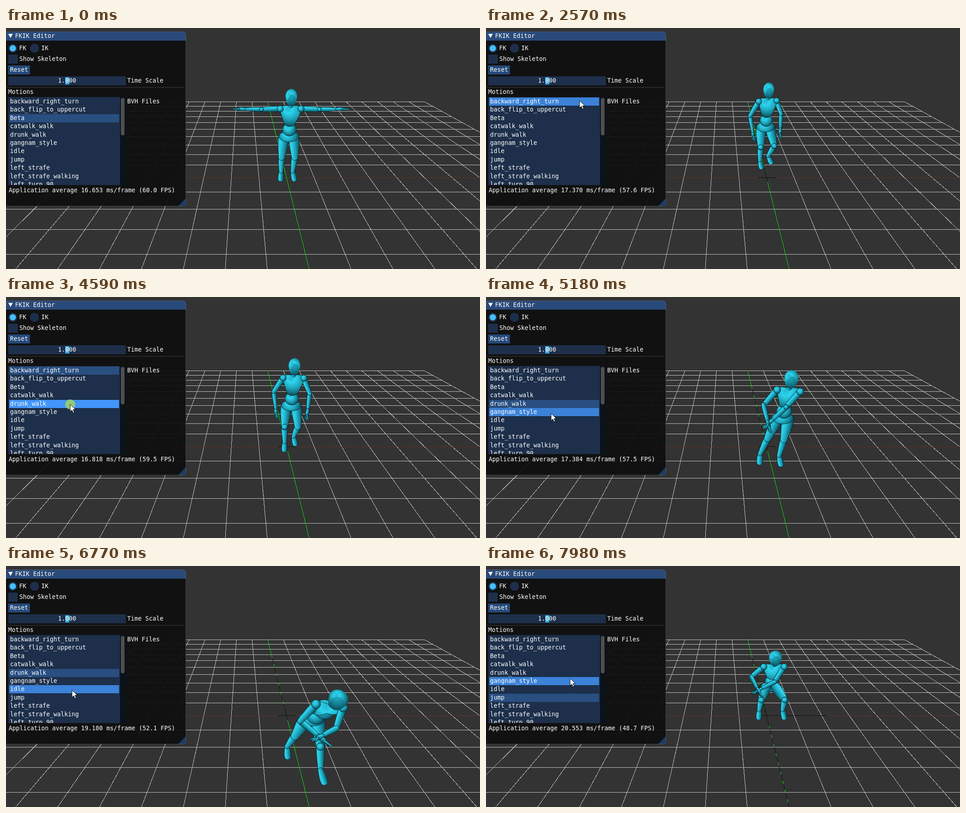
An HTML page with a canvas for the animation above (8 s loop, 1048x534 px).

```html
<!DOCTYPE html>
<html lang="en">
<head>
<meta charset="utf-8">
<title>FKIK Editor</title>
<style>
  html, body { margin: 0; width: 100%; height: 100%; overflow: hidden; background: #333; }
  #stage { position: absolute; left: 0; top: 0; width: 1048px; height: 534px; overflow: hidden;
    font: 13.29px/18px "DejaVu Sans Mono", monospace; color: #fff; }
  #stage * { position: absolute; box-sizing: border-box; white-space: pre; }
  #grid { left: 0; top: 0; shape-rendering: crispEdges; }
  #panel { left: 0; top: 8px; width: 398px; height: 387px; border-radius: 0 7px 7px 0;
    background: rgba(15,15,15,.94); overflow: hidden; }
  #panel::after { content: ""; position: absolute; inset: 0; border: 1px solid rgba(110,110,128,.5);
    border-left: 0; border-radius: 0 7px 7px 0; }
  #bar { left: 0; top: 0; width: 398px; height: 20px; background: #294a7a; }
  #grip { right: 0; bottom: 0; border: 9px solid; border-color: transparent #1c3a64 #1c3a64 transparent; }
  .dot { border-radius: 50%; }
  #list { left: 5px; top: 153px; width: 260px; height: 195px; overflow: hidden; background: #1d2f4a; }
  #track { right: 0; top: 0; width: 13px; height: 195px; background: #0c121c; }
  #thumb { left: 249px; top: 2px; width: 8px; height: 83px; border-radius: 4px; background: #4f4f4f; }
  .row { left: 2px; width: 243px; height: 18px; padding-left: 2px; }
  #tap { width: 22px; height: 22px; margin: -11px; border-radius: 50%; background: rgba(165,215,85,.8); }
  #arrow { overflow: visible; width: 14px; height: 20px; }
</style>
</head>
<body>
<div id="stage">
  <svg id="grid" width="1048" height="534"></svg>
  <canvas id="scene" width="1048" height="534"></canvas>
  <div id="panel"><div id="bar"></div><div id="grip"></div></div>
  <div id="ui"></div>
  <div id="list"><div id="track"></div><div id="thumb"></div></div>
  <div id="tap"></div>
  <svg id="arrow"><path d="M0 0V16L3.8 12.5L6.4 18.5L9 17.3L6.4 11.5H11.5Z" fill="#fff" stroke="#111"/></svg>
</div>
<script>
const $ = id => document.getElementById(id);
const ctx = $('scene').getContext('2d');
const { sin, cos, max, min, hypot, atan2, sqrt, PI } = Math;
const LOOP = 8000, TURN = 1860, TURN_LEN = 1350, DRUNK = 4660, JUMP = 7560;

const mix = (a, b, k) => a.map((v, i) => v + (b[i] - v) * k);
const smooth = k => (k = max(0, min(1, k)), k * k * (3 - 2 * k));
function track(keys, t) {
  const i = keys.findIndex(key => t < key[0]);
  if (i < 1) return keys[i ? keys.length - 1 : 0][1];
  const [t0, a] = keys[i - 1], [t1, b] = keys[i];
  return mix(a, b, (t - t0) / (t1 - t0));
}

// ---------- interface ----------
const px = v => v + 'px';
function add(parent, cls, css, text = '') {
  const el = document.createElement('div');
  el.className = cls;
  el.textContent = text;
  Object.assign(el.style, css);
  return parent.appendChild(el);
}
const box = (x, y, w, h, background, cls = '') =>
  add($('ui'), cls, { left: px(x), top: px(y), width: px(w), height: px(h), background });
const label = (x, y, text) => add($('ui'), '', { left: px(x), top: px(y - 9) }, text);

const BLUE = '#1d2f4a';
box(5, 13, 10, 9, '#fff').style.clipPath = 'polygon(0 0, 100% 0, 50% 100%)';
box(5, 35, 20, 20, BLUE, 'dot');
box(8, 38, 14, 14, '#45bffa', 'dot');
box(53, 35, 20, 20, BLUE, 'dot');
box(5, 59, 21, 20, BLUE);
box(5, 83, 48, 20, '#25497a');
box(5, 107, 260, 20, BLUE);
box(131, 109, 9, 16, '#3eaee0');
box(2, 131, 393, 1, '#3d3d45');
label(20, 17.5, 'FKIK Editor');
label(29, 45, 'FK');
label(78, 45, 'IK');
label(29.5, 69, 'Show Skeleton');
label(9, 93, 'Reset');
label(115, 117, '1.000');
label(268, 117, 'Time Scale');
label(5, 142, 'Motions');
label(268, 163, 'BVH Files');
const stats = label(6, 360, '');

const ROW = 18.4;
const rows = ['backward_right_turn', 'back_flip_to_uppercut', 'Beta', 'catwalk_walk', 'drunk_walk',
  'gangnam_style', 'idle', 'jump', 'left_strafe', 'left_strafe_walking', 'left_turn_90']
  .map((name, i) => add($('list'), 'row', { top: px(Math.round(1 + ROW * i)) }, name));

const pointer = [[70, [95, 393]], [820, [121, 190]], [1690, [205, 163]], [1800, [207, 161]],
  [3400, [207, 161]], [3760, [183, 225]], [4480, [142, 238]], [4750, [142, 238]],
  [5820, [146, 287]], [6770, [146, 275]], [7200, [146, 288]], [7600, [150, 287]], [7980, [186, 249]]];
const frameMs = [[0, [16.653]], [1900, [16.72]], [2570, [17.37]], [3760, [16.951]], [4590, [16.817]],
  [5820, [17.998]], [6770, [19.179]], [7980, [20.553]]];

function drawUi(t) {
  const [x, y] = track(pointer, t);
  const down = [TURN, DRUNK, JUMP].some(up => t > up - 100 && t < up);
  for (const id of ['arrow', 'tap']) {
    $(id).style.left = px(x);
    $(id).style.top = px(y);
  }
  $('arrow').style.visibility = t >= 70 ? 'visible' : 'hidden';
  $('tap').style.visibility = down ? 'visible' : 'hidden';

  const chosen = t < TURN ? 2 : t < DRUNK ? 0 : t < JUMP ? 4 : 7;
  const hover = t > TURN - 120 ? Math.floor((y - 153.8) / ROW) : -1;
  rows.forEach((el, i) => {
    el.style.background = i === hover ? (down ? '#4296fa' : '#3b82d8') : i === chosen ? '#294f81' : 'none';
  });
  const [ms] = track(frameMs, t);
  stats.textContent = `Application average ${ms.toFixed(3)} ms/frame (${(1000 / ms).toFixed(1)} FPS)`;
}

// ---------- camera and floor ----------
const PITCH = .4177, FOCAL = 732, EYE = { x: -1.578, y: 5.836, z: 10.56 };
// World: x right, y up, z away. Gives screen x, y and pixels per unit.
function project([x, y, z]) {
  const drop = EYE.y - y, away = z + EYE.z;
  const k = FOCAL / (drop * sin(PITCH) + away * cos(PITCH));
  return [524 + (x - EYE.x) * k, 267 + (drop * cos(PITCH) - away * sin(PITCH)) * k, k];
}
function floorLine(x0, z0, x1, z1, color, dash = '') {
  const el = document.createElementNS('http://www.w3.org/2000/svg', 'line');
  const ends = [project([x0, 0, z0]), project([x1, 0, z1])];
  ends.forEach(([x, y], i) => {
    el.setAttribute('x' + (i + 1), x);
    el.setAttribute('y' + (i + 1), z0 === z1 ? Math.round(y) + .5 : y);
  });
  el.setAttribute('stroke', color);
  el.setAttribute('stroke-dasharray', dash);
  return $('grid').appendChild(el);
}
for (let i = -10; i <= 10; i++) {
  if (!i) continue;
  floorLine(i, -10, i, 10, '#c6c6c6');
  floorLine(-10, i, 10, i, '#c6c6c6');
}
floorLine(-12, 0, 12, 0, '#6b2a2a');
floorLine(0, -10, 0, 10, '#0bdc0b');
// The axes stay dark where the body has stood.
const DARK = '#0a100a';
const scars = [
  [TURN, floorLine(-.3, 0, .34, 0, DARK)], [TURN, floorLine(0, .8, 0, -.33, DARK)],
  [DRUNK, floorLine(0, 6.4, 0, .1, DARK, '14 7')],
  [JUMP, floorLine(0, -.3, 0, -5, DARK, '14 7')], [JUMP, floorLine(.34, 0, 2.16, 0, DARK)]
];

// ---------- motions ----------
// Body space: x to the viewer's right, y up, then forward. Limbs come as [left, right].
const sides = [-1, 1];
const stand = {
  x: 0, z: 0, hip: 1.6, yaw: 0, lean: 0, side: 0,
  feet: sides.map(s => [s * .21, .24, 0]),
  hands: sides.map(s => [s * .54, 1.5, .1])
};
const step = (phase, stride, lift) => sides.map(s =>
  [s * .18, .24 + lift * max(0, s * sin(phase)), -s * stride * cos(phase)]);

const tee = () => ({ ...stand, hands: sides.map(s => [s * 1.54, 2.58, 0]) });

function backTurn(u) {
  const phase = 2 * PI * (u - .58) / .6;
  return { ...stand, x: .09 - .12 * u, z: 1.41 * u, hip: 1.58, yaw: .5 * u * u,
    side: .03 * sin(phase), feet: step(phase, .18, .12),
    hands: sides.map(s => [s * .54, 1.5, .1 + s * .1 * cos(phase)]) };
}

function drunk(u) {
  const go = max(0, u - 1.16), bend = smooth(go / .95);
  const swing = .58 * bend * cos(2 * PI * (u - 2.11) / 1.4);
  return { ...stand, x: .2 + .13 * sin(1.35 * u), z: -1.1 - 1.9 * go, hip: 1.62 - .12 * bend,
    lean: .2 + .55 * bend, side: .08 + .1 * bend, yaw: .1 * bend,
    feet: sides.map(s => [-.35 + s * .33 + .2 * bend, .24, s * swing]),
    hands: sides.map(s => [-.5 + .42 * bend + s * .05, 1.78 - .2 * bend, .6 + .35 * bend]) };
}

function jump(u) {
  const q = smooth(u / .42);
  const crouch = (from, to) => mix(from, to, q);
  return { ...stand, x: .09 + .05 * q, z: .3 * q, hip: 1.6 - .58 * q, lean: .42 * q,
    feet: stand.feet.map((f, i) => crouch(f, [sides[i] * .42, .24, .33])),
    hands: stand.hands.map((h, i) => crouch(h, [-.5 + sides[i] * .06, 1.25, .72])) };
}

function poseAt(t) {
  if (t < TURN) return tee();
  if (t < DRUNK) return backTurn((t - TURN) % TURN_LEN / 1000);
  return t < JUMP ? drunk((t - DRUNK) / 1000) : jump((t - JUMP) / 1000);
}

// ---------- body ----------
const plus = (a, b, k = 1) => a.map((v, i) => v + b[i] * k);
const dot = (a, b) => a.reduce((sum, v, i) => sum + v * b[i], 0);
const unit = v => v.map(c => c / (hypot(...v) || 1));

// Two-bone reach from a towards b; returns the bent joint and the end.
function reach(a, b, l0, l1, pole) {
  const v = plus(b, a, -1), n = unit(v);
  const d = min(hypot(...v), (l0 + l1) * .998);
  const along = (l0 * l0 - l1 * l1 + d * d) / (2 * d);
  const out = unit(plus(pole, n, -dot(pole, n)));
  return [plus(plus(a, n, along), out, sqrt(max(0, l0 * l0 - along * along))), plus(a, n, d)];
}

const SHADES = ['#24b6cd', '#2dd3ed', '#21b0c7', '#157f92', '#093f4a'];
function shade(g) {
  SHADES.forEach((c, i) => g.addColorStop(i / 4, c));
  return g;
}
function paint(fill) {
  ctx.fillStyle = fill;
  ctx.fill();
  ctx.lineWidth = .9;
  ctx.strokeStyle = '#06272e';
  ctx.stroke();
}
function blob([x, y, k], rx, ry = rx, turn = 0) {
  const r = max(rx, ry) * k;
  ctx.beginPath();
  ctx.ellipse(x, y, rx * k, ry * k, turn, 0, 7);
  paint(shade(ctx.createRadialGradient(x - r * .3, y - r * .4, 0, x - r * .1, y - r * .15, r * 1.2)));
}
function limb(a, b, r0, r1) {
  const dx = b[0] - a[0], dy = b[1] - a[1], len = hypot(dx, dy), turn = atan2(dy, dx);
  const w0 = r0 * a[2], w1 = r1 * b[2], w = max(w0, w1) * 1.1;
  const lit = .45 * sin(turn) > .9 * cos(turn) ? 1 : -1;
  ctx.save();
  ctx.translate(a[0], a[1]);
  ctx.rotate(turn);
  ctx.beginPath();
  ctx.moveTo(0, -w0);
  ctx.bezierCurveTo(len * .3, -w0 * 1.15, len * .7, -w1 * 1.15, len, -w1);
  ctx.arc(len, 0, w1, -PI / 2, PI / 2);
  ctx.bezierCurveTo(len * .7, w1 * 1.15, len * .3, w0 * 1.15, 0, w0);
  ctx.arc(0, 0, w0, PI / 2, PI * 1.5);
  paint(shade(ctx.createLinearGradient(0, lit * w, 0, -lit * w)));
  ctx.restore();
}

function chest(l, r, neck, waist) {
  const k = neck[2], mid = mix(l, r, .5);
  const low = mix(neck, waist, .78), tip = mix(neck, waist, .88);
  const wide = .17 * k, cap = .12 * k;
  ctx.beginPath();
  ctx.moveTo(neck[0] - .09 * k, neck[1]);
  ctx.quadraticCurveTo(l[0], l[1] - cap, l[0] - .04 * k, l[1] - .03 * k);
  ctx.quadraticCurveTo(l[0] + .05 * k, l[1] + .24 * k, low[0] - wide, low[1]);
  ctx.quadraticCurveTo(tip[0], tip[1] + .06 * k, low[0] + wide, low[1]);
  ctx.quadraticCurveTo(r[0] - .05 * k, r[1] + .24 * k, r[0] + .04 * k, r[1] - .03 * k);
  ctx.quadraticCurveTo(r[0], r[1] - cap, neck[0] + .09 * k, neck[1]);
  ctx.closePath();
  paint(shade(ctx.createRadialGradient(mid[0] - .1 * k, mid[1], 0, mid[0], mid[1] + .05 * k, .56 * k)));
}

function skull(at, neck, rx, ry) {
  rx *= at[2];
  ry *= at[2];
  ctx.save();
  ctx.translate(at[0], at[1]);
  ctx.rotate(atan2(at[0] - neck[0], neck[1] - at[1]) * .6);
  ctx.beginPath();
  ctx.moveTo(0, -ry);
  for (const s of [1, -1]) {
    const curve = [[.8, -1], [1.2, -.3], [.9, .2], [.75, .7], [.45, 1], [0, 1]].map(([x, y]) => [x * rx * s, y * ry]);
    ctx.moveTo(0, -ry);
    ctx.bezierCurveTo(...curve[0], ...curve[1], ...curve[2]);
    ctx.bezierCurveTo(...curve[3], ...curve[4], ...curve[5]);
  }
  ctx.fillStyle = shade(ctx.createRadialGradient(-rx * .4, -ry * .4, 0, -rx * .1, -ry * .15, ry * 1.15));
  ctx.fill();
  ctx.beginPath();
  ctx.ellipse(rx * .12, ry * .3, rx * .68, ry * .64, 0, 0, 7);
  ctx.fillStyle = 'rgba(8,95,110,.4)';
  ctx.fill();
  ctx.restore();
}

function drawBody({ x, z, hip, yaw, lean, side, feet, hands }) {
  const see = ([px, py, f]) => project([x + px * cos(yaw) + f * sin(yaw), py, z + px * sin(yaw) - f * cos(yaw)]);
  const spine = d => [d * sin(side), hip + d * cos(lean), d * sin(lean)];
  const parts = [];
  // Each part is queued by its distance, so nearer ones cover the rest.
  const queue = (near, draw) => parts.push({ near, draw });
  const ball = (p, ...size) => { const s = see(p); queue(s[2] + .3, () => blob(s, ...size)); };
  const bone = (p, q, r0, r1) => {
    const a = see(p), b = see(q);
    queue((a[2] + b[2]) / 2, () => limb(a, b, r0, r1));
  };

  const shoulders = sides.map(s => plus(spine(.99), [s * .345 * cos(side), -s * .345 * sin(side), 0]));
  const [l, r] = shoulders.map(see);
  const tilt = atan2(r[1] - l[1], r[0] - l[0]) * .6;
  const neck = see(spine(1.1)), head = see(spine(1.37)), belly = see(spine(.25)), ribs = see(spine(.74));

  sides.forEach((s, i) => {
    const top = [s * .18, hip - .05, 0];
    const [knee, ankle] = reach(top, feet[i], .7, .63, [s * .3, 0, 1]);
    bone(ankle, plus(ankle, [s * .03, -.16, .26]), .07, .095);
    bone(knee, ankle, .105, .068);
    bone(top, knee, .175, .11);
    ball(knee, .108, .096);

    const [elbow, wrist] = reach(shoulders[i], hands[i], .62, .57, [s * .6, -.4, -.5]);
    const dir = unit(plus(wrist, elbow, -1)), palm = plus(wrist, dir, .17);
    bone(shoulders[i], elbow, .09, .07);
    ball(shoulders[i], .108);
    bone(elbow, wrist, .073, .048);
    ball(elbow, .07);
    for (const f of [-1, 0, 1]) bone(palm, plus(plus(wrist, dir, .37 - .04 * f * f), [.04 * f, 0, .05 * f]), .026, .016);
    bone(wrist, palm, .046, .055);
  });
  ball([0, hip, 0], .34, .185, tilt);
  queue(belly[2], () => blob(belly, .235, .215, tilt));
  queue(ribs[2], () => {
    limb(neck, mix(neck, ribs, .2), .075, .09);
    blob(ribs, .27, .24, tilt);
    chest(l, r, neck, belly);
  });
  queue(head[2], () => {
    limb(head, neck, .07, .075);
    skull(head, neck, .19 + .055 * lean, .285 - .07 * lean);
  });
  parts.sort((a, b) => a.near - b.near).forEach(p => p.draw());
}

// ---------- playback ----------
const start = performance.now();
function tick() {
  const t = (performance.now() - start) % LOOP;
  for (const [from, el] of scars) el.style.visibility = t > from ? 'visible' : 'hidden';
  ctx.clearRect(0, 0, 1048, 534);
  drawBody(poseAt(t));
  drawUi(t);
  requestAnimationFrame(tick);
}
tick();
</script>
</body>
</html>
```
